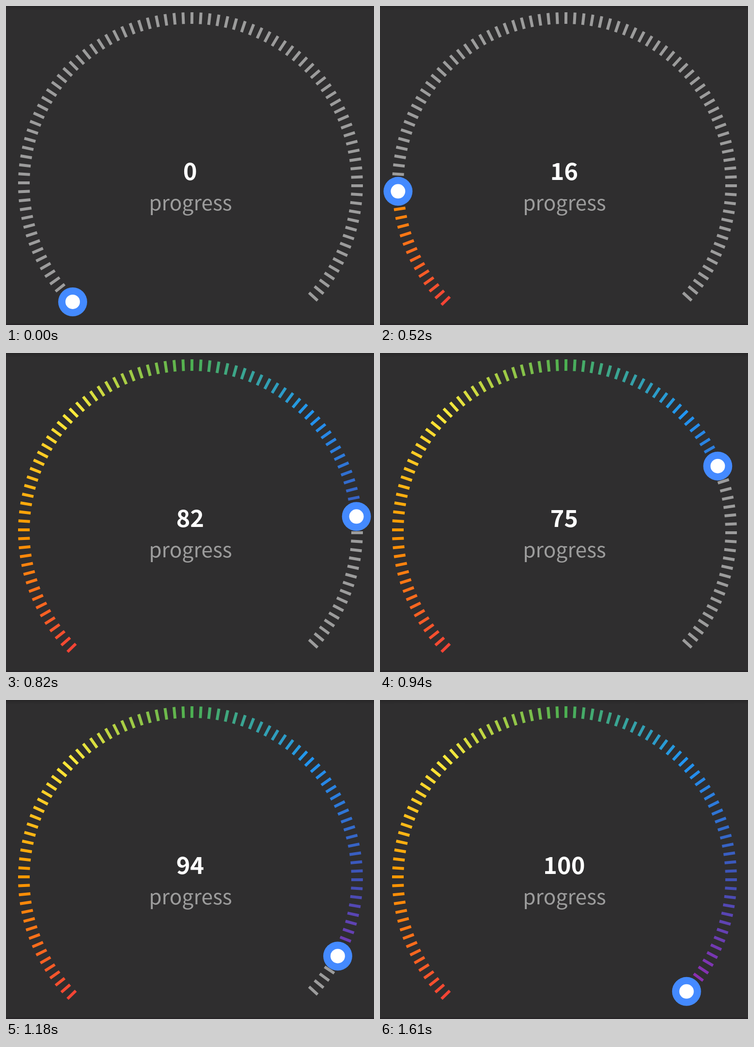
Animation of 762 by 662 pixels, one loop 1.64 s. Source, as an HTML page:

```html
<!DOCTYPE html>
<html lang="en">
<head>
<meta charset="utf-8">
<title>Progress gauge</title>
<style>
  html, body { margin: 0; width: 100%; height: 100%; overflow: hidden; background: #2f2e2f; }
  svg { display: block; width: 762px; height: 662px; }
  text { font-family: "Noto Sans CJK JP", "Noto Sans CJK SC", "Noto Sans CJK", "Noto Sans", sans-serif; text-anchor: middle; }
  #count { font-size: 49px; font-weight: 700; fill: #fff; }
  #label { font-size: 42.7px; fill: #9c9c9c; }
</style>
</head>
<body>
<svg viewBox="0 0 762 662">
  <defs>
    <linearGradient id="edge" x2="0" y2="1">
      <stop offset="0" stop-color="#272627"/>
      <stop offset="1" stop-color="#2f2e2f"/>
    </linearGradient>
  </defs>
  <rect width="762" height="662" fill="#2f2e2f"/>
  <rect width="762" height="9" fill="url(#edge)"/>
  <rect y="659" width="762" height="3" fill="#292629"/>
  <g id="ticks" stroke-width="6"></g>
  <text id="count" x="381.3" y="361">0</text>
  <text id="label" x="382" y="424">progress</text>
  <g id="knob">
    <circle r="30" fill="#448aff"/>
    <circle r="15" fill="#fff"/>
  </g>
</svg>
<script>
const LOOP = 1640, STEP = 30;
const CX = 382, CY = 370, R = 345, HALF = 12;
const START = 135, SWEEP = 270, PITCH = 3, DASH = 0.9;
const GREY = '#9c9c9c';
const COLORS = [[244, 67, 54], [255, 152, 0], [255, 235, 59], [76, 175, 80],
                [33, 150, 243], [63, 81, 181], [156, 39, 176]];
// time in ms -> phase of the bounce
const PHASE = [[375.6, 0], [520, 0.1444], [820, 0.4505], [1060, 0.6845], [1375, 1]];

const $ = id => document.getElementById(id);

function point(deg, r) {
  const a = deg * Math.PI / 180;
  return [CX + r * Math.cos(a), CY + r * Math.sin(a)];
}

function gradient(f) {
  const x = f * (COLORS.length - 1);
  const i = Math.min(Math.floor(x), COLORS.length - 2);
  return `rgb(${COLORS[i].map((c, k) => Math.round(c + (COLORS[i + 1][k] - c) * (x - i)))})`;
}

function phaseAt(t) {
  if (t <= PHASE[0][0]) return 0;
  for (let i = 1; i < PHASE.length; i++) {
    const [t0, p0] = PHASE[i - 1], [t1, p1] = PHASE[i];
    if (t <= t1) return p0 + (p1 - p0) * (t - t0) / (t1 - t0);
  }
  return 1;
}

function bounceOut(t) {
  const k = 7.5625, d = 2.75;
  if (t < 1 / d) return k * t * t;
  if (t < 2 / d) return k * (t - 1.5 / d) ** 2 + 0.75;
  if (t < 2.5 / d) return k * (t - 2.25 / d) ** 2 + 0.9375;
  return k * (t - 2.625 / d) ** 2 + 0.984375;
}

const ticks = Array.from({ length: SWEEP / PITCH }, (_, i) => {
  const el = document.createElementNS('http://www.w3.org/2000/svg', 'path');
  const deg = START + i * PITCH + 0.5;
  el.setAttribute('d', `M${point(deg, R - HALF)}L${point(deg, R + HALF)}`);
  $('ticks').append(el);
  return { el, at: i * PITCH, color: gradient((deg - START) / SWEEP) };
});

function draw(ms) {
  const t = Math.max(0, 10 + STEP * Math.floor((ms - 10) / STEP + 1e-6));
  const value = bounceOut(phaseAt(t));
  const sweep = value * SWEEP;
  for (const { el, at, color } of ticks) el.setAttribute('stroke', at < sweep ? color : GREY);

  // the knob sits at the end of the last lit dash
  const last = Math.min(Math.floor(sweep / PITCH), ticks.length - 1) * PITCH;
  const deg = START + last + Math.min(sweep - last, DASH);
  $('knob').setAttribute('transform', `translate(${point(deg, R)})`);
  $('count').textContent = Math.round(value * 100);
}

const begin = performance.now();
function tick() {
  draw((performance.now() - begin) % LOOP);
  requestAnimationFrame(tick);
}
tick();
</script>
</body>
</html>
```
